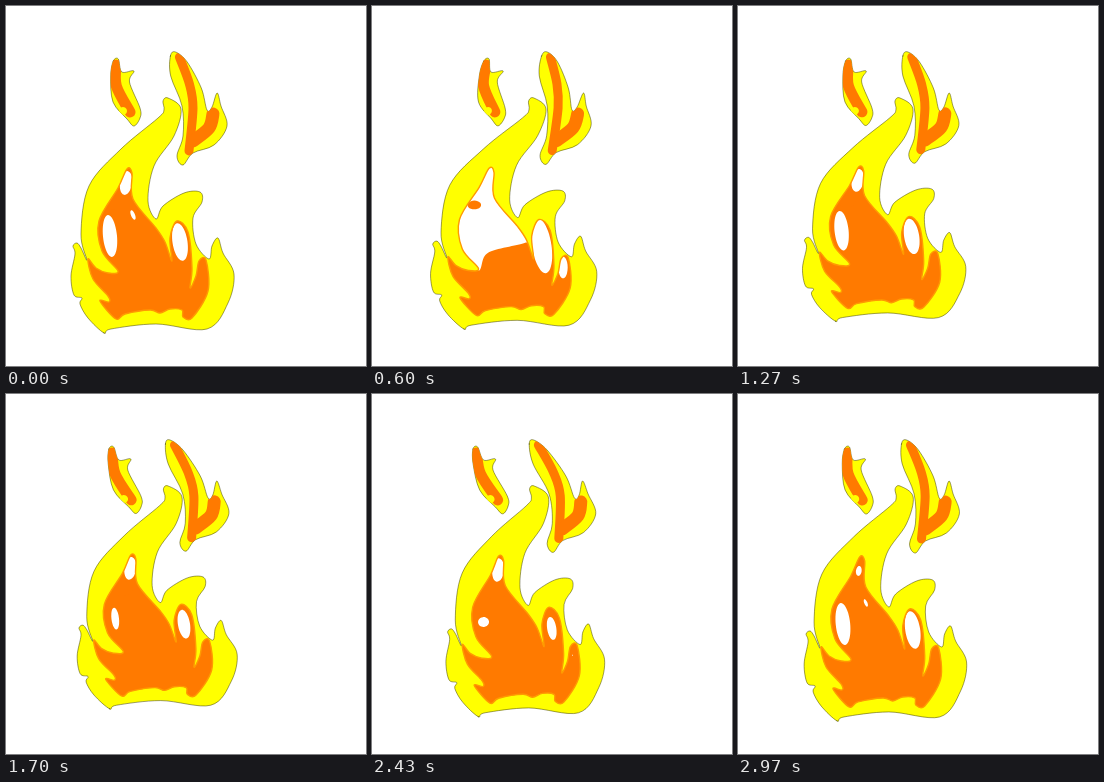
Recreate the animation shown at these times as an HTML page with a canvas. Size 360x360 px, loop 3010 ms.

```html
<!DOCTYPE html>
<html lang="en">
<head>
<meta charset="utf-8">
<title>Flame</title>
<style>
html, body { margin: 0; width: 100%; height: 100%; overflow: hidden; background: #fff; }
canvas { display: block; width: 360px; height: 360px; }
</style>
</head>
<body>
<canvas id="stage" width="360" height="360"></canvas>
<script>
const LOOP = 3010, STEPS = 90, TURN = 2 * Math.PI / LOOP;
const YELLOW = '#ffff00', ORANGE = '#ff7a00', WHITE = '#fff';
const g = document.getElementById('stage').getContext('2d');

// Key points at rest, joined by smooth curves
const pts = s => s.trim().split(/\s+/).map(p => p.split(',').map(Number));

const body = pts(`98,327 82,312 74,298 76,292 68,289 65,270 69,248 67,240 71,237 75,242 81,254 75,228
  83,180 115,143 152,112 158,104 157,95 162,92 175,103 168,130 148,160 142,195 150,213 157,200 178,187
  194,186 196,196 187,212 190,238 203,253 206,240 212,232 217,247 228,268 222,297 201,323 150,318 105,323`);
const core = pts(`82,253 90,262 102,267 112,265 96,245 93,215 112,182 121,163 126,167 127,193 150,222
  159,236 166,255 164,232 171,215 182,226 186,262 184,282 190,270 193,255 200,254 202,285 186,312 177,311
  176,304 164,303 154,307 144,304 119,308 110,313 94,295 103,296 102,290 87,273`);
const ember = pts(`106,55 111,53 115,66 127,65 123,76 134,102 134,112 128,120 121,113 107,96 104,70`);
const tongue = pts(`163,50 168,46 180,56 195,82 201,104 206,101 211,87 215,100 221,120 208,139 187,147
  177,159 171,150 177,130 176,100 164,70`);
const emberHeart = pts('109,59 110,80 124,106');
const tongueHeart = [pts('172,51 183,78 187,102 183,145'), pts('207,108 203,122 187,135')];

const clamp = v => Math.max(0, Math.min(1, v));
function ramp(a, b, t) {
  const f = clamp((t - a) / (b - a));
  return f * f * (3 - 2 * f);
}

// The base circles while the tips lean the other way
function warp([x, y], t) {
  const lean = y < 90 ? (90 - y) / 6 : -6.5 * (1 - Math.exp((90 - y) / 60));
  const reach = lean + (x - 150) / 40 * clamp((y - 120) / 60);
  const swing = Math.cos(TURN * (t - 650)) - (y > 90 ? .21 : 0);
  const lift = 6 * Math.max(0, (y - 93) / 228) ** 1.5;
  return [x + reach * swing, y + lift * (Math.cos(TURN * t) - 1)];
}

function trace(shape, t, closed = true) {
  const p = shape.map(q => warp(q, t)), n = p.length;
  const at = i => p[closed ? (i + n) % n : Math.max(0, Math.min(n - 1, i))];
  const path = new Path2D();
  path.moveTo(...p[0]);
  for (let i = 0; i < (closed ? n : n - 1); i++) {
    const a = at(i - 1), b = at(i), c = at(i + 1), d = at(i + 2);
    path.bezierCurveTo(b[0] + (c[0] - a[0]) / 6, b[1] + (c[1] - a[1]) / 6,
      c[0] - (d[0] - b[0]) / 6, c[1] - (d[1] - b[1]) / 6, ...c);
  }
  if (closed) path.closePath();
  return path;
}

function fill(path, color) {
  g.fillStyle = color;
  g.fill(path);
}

function stroke(path, color, width) {
  g.strokeStyle = color;
  g.lineWidth = width;
  g.stroke(path);
}

function within(path, paint) {
  g.save();
  g.clip(path);
  paint();
  g.restore();
}

function yellow(shape, t) {
  const path = trace(shape, t);
  fill(path, YELLOW);
  stroke(path, 'rgba(50,50,0,.6)', .8);
  return path;
}

function blob(t, color, x, y, rx, ry, tilt = 0) {
  if (rx <= 0 || ry <= 0) return;
  const shape = Array.from({ length: 12 }, (_, i) => {
    const u = rx * Math.cos(i * Math.PI / 6), v = ry * Math.sin(i * Math.PI / 6);
    return [x + u * Math.cos(tilt) - v * Math.sin(tilt), y + u * Math.sin(tilt) + v * Math.cos(tilt)];
  });
  fill(trace(shape, t), color);
}

// Gaps open twice per loop: a long low, then a short deeper one
function gaps(t) {
  const first = ramp(0, 250, t) - ramp(900, 1230, t);
  const second = ramp(2350, 2700, t) - ramp(2760, 2950, t);
  const low = first + second, drop = 16 * second;
  const shut = ramp(1300, 2100, t) - ramp(2350, 2970, t);
  const end = ramp(2880, 2970, t);
  const grown = ramp(330, 870, t) + ramp(1300, 2100, t);

  const hollow = [[86, 150], [87, 240], [111, 267 + drop / 3], [121, 249 + drop],
    [157, 239 + drop], [163, 232], [142, 150]];
  within(trace(hollow, t), () => {
    const open = 1 - shut;
    blob(t, WHITE, 104, 230, 7 * open + 75 * low, 21 * open + 62 * low, -.1);
    blob(t, ORANGE, 107 + 2.2 * grown ** 2, 201 - 2 * grown, 5 + 4 * grown, 3 + 3.5 * grown);
    blob(t, WHITE, 120, 177, 6 - 4 * end, 12 - 9 * end, .15);
    const speck = 1 - ramp(0, 100, t) + end;
    blob(t, WHITE, 127, 209, 2 * speck, 5 * speck, -.4);
  });
  blob(t, WHITE, 174, 236 + 6 * low, 7.5 - 3 * shut + 2 * low, 19 - 8 * shut + 9 * low, -.15);
  blob(t, WHITE, 195, 264, 4.5 * low, 11 * low);
}

function draw(now) {
  const t = Math.floor(now % LOOP / LOOP * STEPS) * LOOP / STEPS;
  g.fillStyle = WHITE;
  g.fillRect(0, 0, 360, 360);
  g.lineCap = g.lineJoin = 'round';

  within(yellow(ember, t), () => {
    stroke(trace(emberHeart, t, false), ORANGE, 11);
    blob(t, YELLOW, 117, 105, 4, 4);
  });
  within(yellow(tongue, t), () => {
    tongueHeart.forEach((line, i) => stroke(trace(line, t, false), ORANGE, 9 + 4 * i));
  });

  yellow(body, t);
  const inside = trace(core, t);
  fill(inside, ORANGE);
  within(inside, () => gaps(t));
  stroke(inside, '#ff9a00', 1.4);
  requestAnimationFrame(() => draw(performance.now() - start));
}

const start = performance.now();
draw(0);
</script>
</body>
</html>
```
